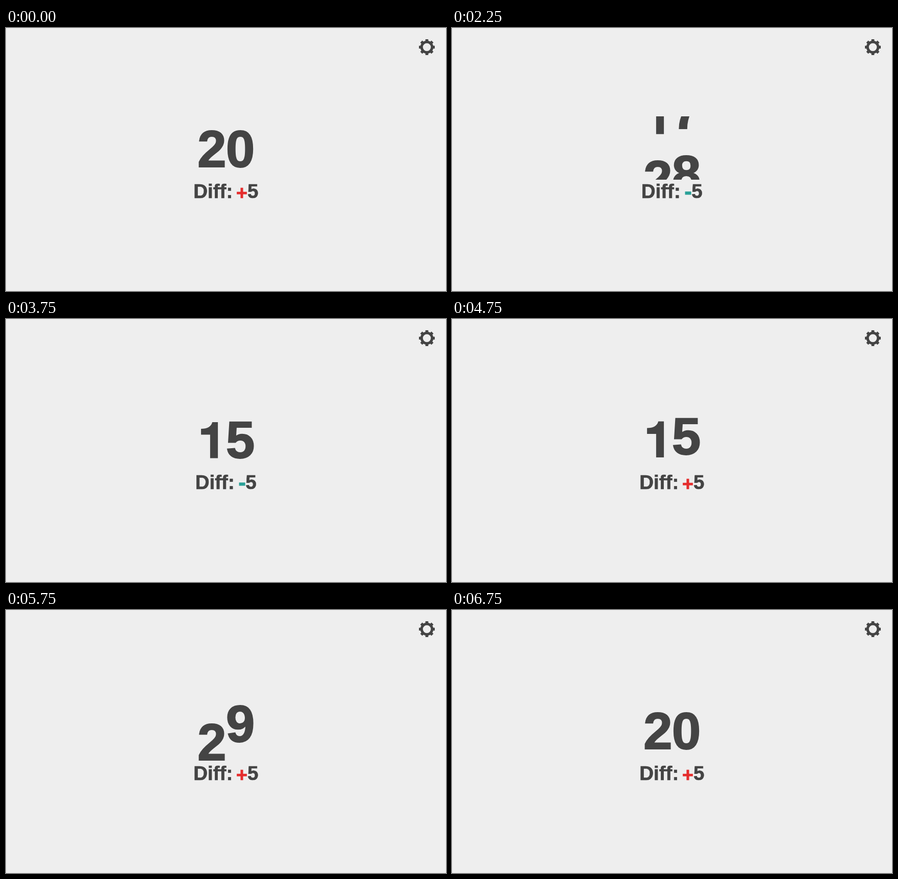
An HTML page with a canvas that plays this animation: 862 px wide and 515 px high, repeating every 7250 ms.

```html
<!DOCTYPE html>
<html lang="en">
<head>
<meta charset="utf-8">
<title>Counter</title>
<style>
  html, body { margin: 0; width: 100%; height: 100%; overflow: hidden; background: #eee; }
  canvas { display: block; }
</style>
</head>
<body>
<canvas id="stage" width="862" height="515"></canvas>
<script>
const ctx = document.getElementById('stage').getContext('2d');
const DARK = '#444', RED = '#e52d2d', TEAL = '#2aa198', BG = '#eee';
const FAMILY = '"Liberation Sans", Arial, sans-serif';
const LOOP = 7250, STEP = 250, DURATION = 2000;
const DOWN = 1685, UP = 4706;
const WINDOW = { top: 173, bottom: 297 }, PITCH = 124, BASELINE = 272.5;
const ONE = new Path2D('M11.7 -70.5V0H-3.5V-46H-21.3V-57.5C-9 -57.5 -1 -62 .7 -70.5Z');

// CSS "ease": cubic-bezier(.25, .1, .25, 1)
function ease(x) {
  if (x <= 0) return 0;
  if (x >= 1) return 1;
  const bezier = (a, b, s) => 3 * a * s * (1 - s) ** 2 + 3 * b * s * s * (1 - s) + s ** 3;
  let lo = 0, hi = 1;
  for (let i = 0; i < 30; i++) {
    const mid = (lo + hi) / 2;
    if (bezier(.25, .25, mid) < x) lo = mid; else hi = mid;
  }
  return bezier(.1, 1, lo);
}

// Bold text, thickened by a fine outline
function text(str, x, y, size, color = DARK, align = 'left') {
  ctx.font = `bold ${size}px ${FAMILY}`;
  ctx.textAlign = align;
  ctx.fillStyle = ctx.strokeStyle = color;
  ctx.lineWidth = size * .018;
  ctx.fillText(str, x, y);
  ctx.strokeText(str, x, y);
}

function digit(n, x, y) {
  if (n !== 1) return text(n, x, y - .3, 102, DARK, 'center');
  // A plain "1" without a foot
  ctx.save();
  ctx.translate(x, y);
  ctx.fillStyle = DARK;
  ctx.fill(ONE);
  ctx.restore();
}

function column(value, x) {
  const base = Math.floor(value + 1e-6);
  for (let n = base; n <= base + 1; n++) {
    digit(n % 10, x, BASELINE + (n - value) * PITCH);
  }
}

function counter(left) {
  ctx.save();
  ctx.beginPath();
  ctx.rect(340, WINDOW.top, 182, WINDOW.bottom - WINDOW.top);
  ctx.clip();
  column(1 + left, 403.4);
  column(15 + 5 * left, 459);
  ctx.restore();
}

function difference(falling) {
  const y = 333.4, size = 38.5;
  text('Diff:', falling ? 370.8 : 367.3, y, size);
  if (falling) text('-', 462.5, y + 1.5, 44, TEAL, 'center');
  else text('+', 462, y + 2.7, size, RED, 'center');
  text('5', falling ? 480 : 483.8, y, size, DARK, 'center');
}

function gear(x, y) {
  ctx.save();
  ctx.translate(x, y);
  ctx.fillStyle = ctx.strokeStyle = DARK;
  ctx.lineWidth = 5;
  ctx.beginPath();
  ctx.arc(0, 0, 10.3, 0, 2 * Math.PI);
  ctx.stroke();
  for (let i = 0; i < 8; i++) {
    ctx.fillRect(10, -2.8, 5.5, 5.6);
    ctx.rotate(Math.PI / 4);
  }
  ctx.restore();
}

function draw(now) {
  const t = Math.floor((now % LOOP) / STEP) * STEP;
  const falling = t >= 1750 && t < 4750;
  const progress = start => ease((t - start) / DURATION);
  ctx.fillStyle = BG;
  ctx.fillRect(0, 0, 862, 515);
  gear(824.5, 37.5);
  counter(t < 4750 ? 1 - progress(DOWN) : progress(UP));
  difference(falling);
}

let start;
function tick(now) {
  start ??= now;
  draw(now - start);
  requestAnimationFrame(tick);
}
draw(0);
requestAnimationFrame(tick);
</script>
</body>
</html>
```
